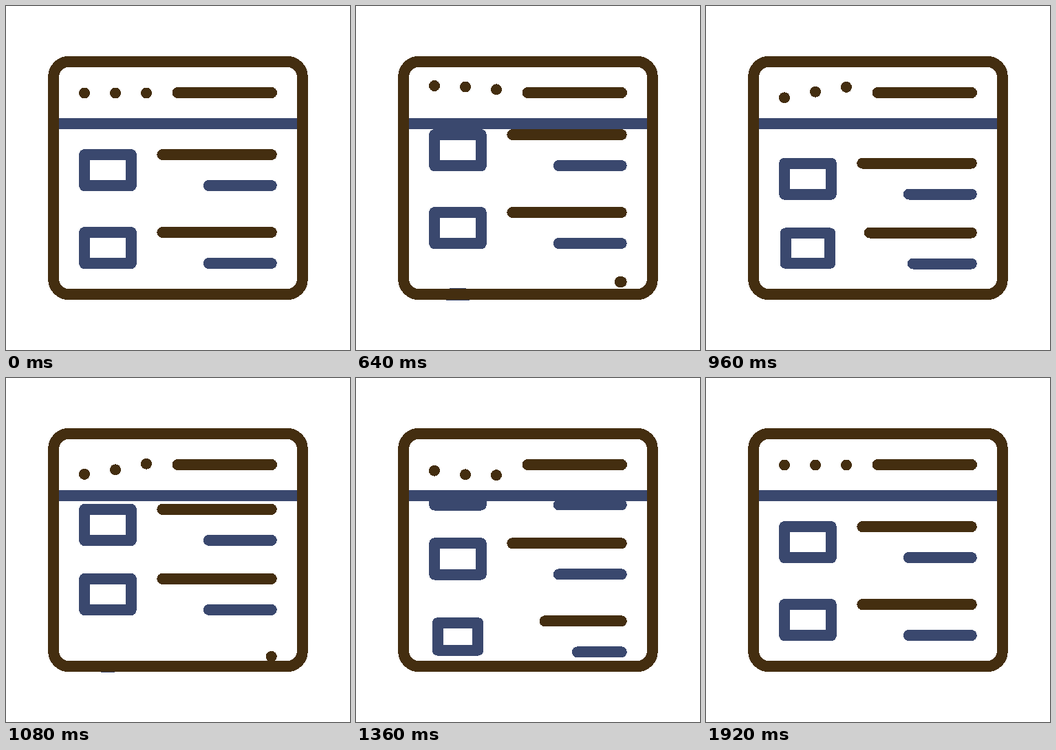
Write an HTML page that moves like this. It is 500 by 500 pixels and loops after 2000 ms.

```html
<!DOCTYPE html>
<html lang="en">
<head>
<meta charset="utf-8">
<title>Scrolling list icon</title>
<style>
  html, body { margin: 0; height: 100%; overflow: hidden; background: #fff; }
  svg { display: block; width: 100%; height: 100%; }
  path, rect { fill: none; stroke-width: 16; stroke-linecap: round; stroke-linejoin: round; }
  .brown { stroke: #442e10; }
  .blue { stroke: #3a486e; }
</style>
</head>
<body>
<svg viewBox="0 0 500 500" shape-rendering="crispEdges">
  <clipPath id="page"><path d="M0 171H500V428H0z"/></clipPath>
  <g clip-path="url(#page)">
    <path id="titles" class="brown"/>
    <path id="details" class="blue"/>
  </g>
  <path class="blue" d="M68.5 171H431.5"/>
  <rect class="brown" x="69.2" y="80.8" width="361.6" height="338.4" rx="22"/>
  <path class="brown" d="M249.5 126H386"/>
  <g fill="#442e10">
    <circle cx="114" r="8"/>
    <circle cx="159" r="8"/>
    <circle cx="204" r="8"/>
  </g>
</svg>
<script>
const LOOP = 2000, STEP = 40, RIGHT = 385.8;
const titles = document.getElementById('titles');
const details = document.getElementById('details');
const dots = document.querySelectorAll('circle');

const clamp = v => Math.min(1, Math.max(0, v));

// Cubic Bezier easing, solved by bisection
function bezier(x1, y1, x2, y2) {
  const at = (a, b, u) => 3 * u * (1 - u) ** 2 * a + 3 * u * u * (1 - u) * b + u ** 3;
  return p => {
    if (p <= 0 || p >= 1) return clamp(p);
    let lo = 0, hi = 1;
    for (let i = 0; i < 24; i++) {
      const mid = (lo + hi) / 2;
      if (at(x1, x2, mid) < p) lo = mid; else hi = mid;
    }
    return at(y1, y2, lo);
  };
}

const glide = bezier(2 / 3, 0, 1 / 3, 1);
const soft = bezier(1 / 3, 0, 2 / 3, 1);
const pop = bezier(0.2, 0.4, 0.4, 1);

// Resting height of each row and the time it starts to grow
const rows = [[216, -LOOP], [329, -LOOP], [430, 577], [543, 1067]];
const GROW = 510;

// Vertical keys of a dot: time, height
const bounce = [[170, 126.6], [630, 116], [1164, 141.6], [1580, 126.6]];

function dotY(t) {
  let y = bounce[0][1];
  for (let i = 1; i < bounce.length; i++) {
    const [t0, y0] = bounce[i - 1], [t1, y1] = bounce[i];
    y += (y1 - y0) * soft((t - t0) / (t1 - t0));
  }
  return y;
}

const bar = (length, y) => `M${RIGHT - length} ${y}H${RIGHT}`;

function box(cx, cy, scale) {
  const w = 67.6 * scale, h = 45.2 * scale;
  return `M${cx - w / 2} ${cy - h / 2}h${w}v${h}h${-w}z`;
}

function draw(t) {
  const scroll = 214 * glide(t / 1960);
  let brown = '', blue = '';
  for (const [top, start] of rows) {
    if (t < start) continue;
    const y = top - scroll, p = (t - start) / GROW, grow = glide(p);
    brown += bar(158.5 * grow, y);
    blue += bar(91 * grow, y + 45) + box(148, y + 22.6, pop(p));
  }
  titles.setAttribute('d', brown);
  details.setAttribute('d', blue);
  dots.forEach((dot, i) => dot.setAttribute('cy', dotY(t - 120 * i)));
}

const begin = performance.now();
function tick() {
  const t = (performance.now() - begin) % LOOP;
  draw(Math.floor(t / STEP) * STEP);
  requestAnimationFrame(tick);
}
tick();
</script>
</body>
</html>
```
